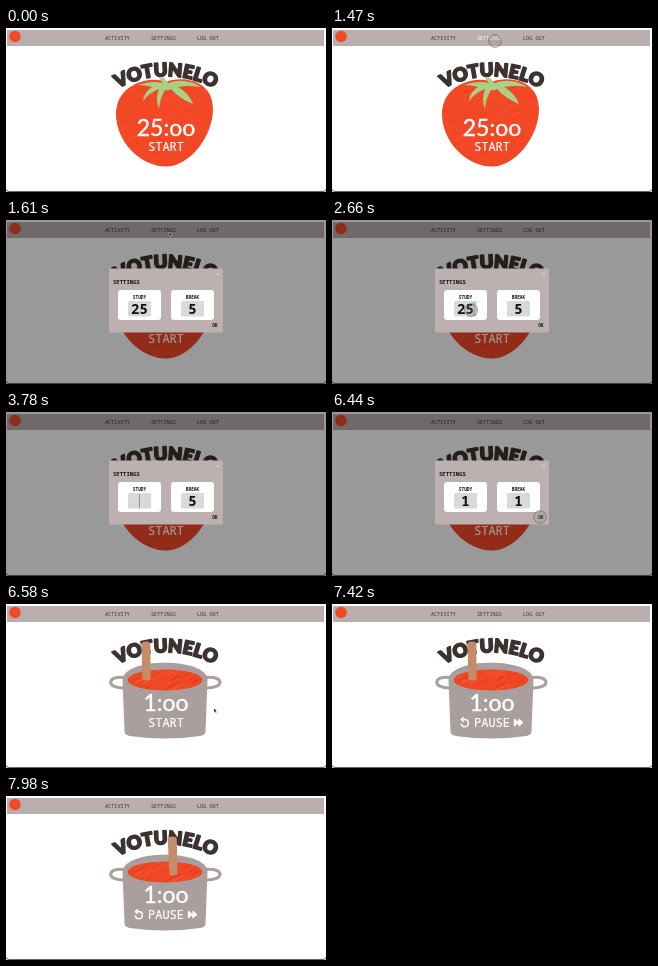
These frames come from a looping animation (320x164 px, 8000 ms). An HTML page:

```html
<!DOCTYPE html>
<html lang="en">
<head>
<meta charset="utf-8">
<title>Study timer</title>
<style>
  html, body { margin: 0; width: 100%; height: 100%; overflow: hidden; background: #fff; }
  svg { display: block; width: 100vw; height: 100vh; font-family: "Noto Sans Mono", "DejaVu Sans Mono", monospace; }
  text { stroke-linejoin: round; paint-order: stroke; }
  .nav { font-size: 5.2px; font-weight: 500; fill: #3a3131; }
  .nav .hover { fill: #fff; }
  .title { font-family: Lato, sans-serif; font-size: 18.5px; font-weight: 900; fill: #3b3231; stroke: #3b3231; stroke-width: 1.6; letter-spacing: -.2px; }
  .timer { fill: #fff; stroke: #fff; text-anchor: middle; }
  .clock { font-family: Lato, sans-serif; font-size: 23px; stroke-width: .4; }
  .action { font-size: 12px; stroke-width: .2; }
  .icon { fill: none; stroke: #fff; stroke-width: 1.4; stroke-linecap: round; stroke-linejoin: round; }
  .dialog { font-weight: 700; fill: #111; }
  .mid { text-anchor: middle; }
</style>
</head>
<body>
<svg viewBox="0 0 320 164" preserveAspectRatio="none">
  <defs>
    <path id="arc" d="M82 85A101 101 0 0 1 238 85"/>
    <path id="tomatoShape" d="M160 54C173 48 207 50 207 81C207 108 184 138.500 160 138.500C135 138.500 110 114 110 86C110 55 146 47 160 54Z"/>
    <path id="potShape" d="M116.500 76C116.500 53 201.500 53 201.500 76L199.500 128Q199 131 194 132Q159 137 124 132Q119 131 118.500 128Z"/>
    <ellipse id="soupShape" cx="159" cy="76" rx="37.500" ry="10.500"/>
    <clipPath id="tomatoClip"><use href="#tomatoShape"/></clipPath>
    <clipPath id="potClip"><use href="#potShape"/></clipPath>
    <clipPath id="soupClip"><use href="#soupShape"/></clipPath>
  </defs>

  <rect width="320" height="164" fill="#fff"/>
  <rect x="1" y="2" width="317" height="16" fill="#bbaeae"/>
  <circle cx="9" cy="8.500" r="5.800" fill="#f04a28"/>
  <g class="nav">
    <text x="99" y="12">ACTIVITY</text>
    <text id="settingsLink" x="145" y="12">SETTINGS</text>
    <text x="191" y="12">LOG OUT</text>
  </g>
  <path d="M0 161Q0 163.500 3 163.500H317Q320 163.500 320 161" fill="none" stroke="#666"/>

  <text class="title mid"><textPath href="#arc" startOffset="50%">VOTUNELO</textPath></text>

  <g id="tomato">
    <use href="#tomatoShape" fill="#f34826"/>
    <g id="tomatoGrain" clip-path="url(#tomatoClip)"/>
    <path fill="#a9d084" d="M132 57Q146 52 157 55Q154 52 153 50L158 50Q160 52 162 55Q180 49 195 59Q182 57 172 59Q183 65 187 76Q174 71 165 61Q163 63 159 62Q154 70 153 81Q149 71 153 61Q143 65 137 73Q138 64 146 59Q139 57 132 57Z"/>
  </g>

  <g id="pot">
    <g fill="none" stroke="#aaa09e" stroke-width="3">
      <path d="M119 73.500C100 71 100 85 119 84"/>
      <path d="M199 73.500C219 71 219 85 199 84"/>
    </g>
    <use href="#potShape" fill="#a99f9d"/>
    <g id="potGrain" clip-path="url(#potClip)"/>
    <use href="#soupShape" fill="#f04725"/>
    <g id="soupGrain" clip-path="url(#soupClip)"/>
    <path id="spoon" d="M-4.500 -35Q-4.500 -38 0 -38Q4.500 -38 4.500 -35L4 0Q0 2 -4 0Z" fill="#c28d68"/>
  </g>

  <text id="clock" class="timer clock" x="160" y="108"></text>
  <text id="action" class="timer action" x="160" y="122.800"></text>
  <g id="controls" class="icon">
    <path d="M129.500 115.500H133A3.600 3.600 0 1 1 129.300 120M131.300 113.600L129.300 115.500L131.300 117.400"/>
    <path d="M182.500 115.500L186 118.500L182.500 121.500ZM187 115.500L190.500 118.500L187 121.500Z" fill="#fff"/>
  </g>

  <g id="dialog" class="dialog">
    <rect width="320" height="164" fill="#000" opacity=".4"/>
    <rect x="103" y="48.500" width="114" height="64" rx="1" fill="#bdb0b0"/>
    <path d="M210.800 53.300l2 2m0-2l-2 2" stroke="#eee" stroke-width=".6"/>
    <text x="107" y="63.500" font-size="5.600">SETTINGS</text>
    <g fill="#fff">
      <rect x="112" y="70" width="43" height="30" rx="3"/>
      <rect x="165" y="70" width="43" height="30" rx="3"/>
    </g>
    <g fill="#d9d9d9">
      <rect x="122" y="81" width="23" height="15.500" rx="1"/>
      <rect x="175" y="81" width="23" height="15.500" rx="1"/>
    </g>
    <g class="mid" font-size="4.500">
      <text x="133.500" y="79">STUDY</text>
      <text x="186.500" y="79">BREAK</text>
      <text x="209" y="107">OK</text>
    </g>
    <g class="mid" font-size="14">
      <text id="study" x="133.500" y="93.500"></text>
      <text id="rest" x="186.500" y="93.500"></text>
    </g>
    <path id="caret" d="M0 82V96" stroke="#777" stroke-width=".7"/>
  </g>

  <g id="pointer">
    <circle id="ring" r="6.300" fill="#888" fill-opacity=".2" stroke="#6c6666" stroke-width=".7"/>
    <path id="arrow" d="M0 -1V3.200L1 2.300L1.800 3.800L2.500 3.400L1.800 2H3Z" fill="#111" stroke="#fff" stroke-width=".35"/>
  </g>
</svg>
<script>
const LOOP = 8000, TICK = 70;
const $ = id => document.getElementById(id);
const show = (id, on) => { $(id).style.display = on ? '' : 'none'; };
const within = (t, spans) => spans.some(([a, b]) => t >= a && t < b);
const latest = (t, steps) => steps.filter(s => s[0] <= t).pop()[1];

// Crayon strokes over a filled shape
function grain(id, count, seed, [x, y, w, h], colors, opacity) {
  const rand = () => (seed = seed * 16807 % 2147483647) / 2147483647;
  for (let i = 0; i < count; i++) {
    const line = document.createElementNS('http://www.w3.org/2000/svg', 'path');
    const len = 4 + rand() * 9;
    line.setAttribute('d', `M${x + rand() * w} ${y + rand() * h}l${len} ${-len * (.2 + rand() * .5)}`);
    line.setAttribute('stroke', colors[i % colors.length]);
    line.setAttribute('stroke-width', .6);
    line.setAttribute('opacity', opacity);
    $(id).append(line);
  }
}
grain('tomatoGrain', 120, 71, [106, 52, 100, 90], ['#ff7a50', '#d93618'], .3);
grain('potGrain', 110, 29, [112, 60, 88, 76], ['#bdb4b1', '#988d8b'], .3);
grain('soupGrain', 45, 53, [118, 66, 76, 22], ['#ff7b4e', '#d23116'], .55);

const path = [
  [700, 69, 163], [1400, 163, 13], [2030, 163, 13], [2520, 139, 90],
  [4270, 139, 90], [5040, 192, 90], [5740, 192, 90], [6370, 208, 105],
  [7000, 208, 106], [7350, 162, 119], [LOOP, 162, 119]
];
const pointerOn = [[700, 3570], [4340, 5600], [5810, 7420]];
const clicks = [[1470, 1610], [2660, 2800], [5110, 5250], [6440, 6580], [7350, 7420]];
const carets = [
  [0, 0], [2660, 142], [3220, 0], [3570, 138], [3710, 133.5],
  [4270, 138], [4830, 0], [5110, 191.5], [5600, 186.5], [5740, 191.5], [6300, 0]
];
const studyText = [[0, '25'], [3570, '2'], [3710, ''], [4270, '1']];
const restText = [[0, '5'], [5600, ''], [5740, '1']];
const spoonSteps = [[0, 0], [7630, .2], [7700, .4], [7770, .6], [7910, .8], [7980, 1]];

function pointerAt(t) {
  const i = path.findIndex(p => p[0] > t);
  if (i < 1) return path[0].slice(1);
  const [t0, x0, y0] = path[i - 1], [t1, x1, y1] = path[i];
  const u = (t - t0) / (t1 - t0), k = u * u * (3 - 2 * u);
  return [x0 + (x1 - x0) * k, y0 + (y1 - y0) * k];
}

function draw(time) {
  const t = Math.floor(time % LOOP / TICK) * TICK;
  const cooking = t >= 6580, running = t >= 7420;

  show('tomato', !cooking);
  show('pot', cooking);
  show('controls', running);
  show('dialog', within(t, [[1610, 6580]]));
  $('settingsLink').classList.toggle('hover', within(t, [[1330, 1610]]));
  $('clock').textContent = cooking ? '1:oo' : '25:oo';
  $('clock').setAttribute('y', cooking ? 107 : 108);
  $('action').textContent = running ? 'PAUSE' : 'START';

  $('study').textContent = latest(t, studyText);
  $('rest').textContent = latest(t, restText);
  const caret = latest(t, carets);
  show('caret', caret);
  $('caret').setAttribute('transform', `translate(${caret})`);

  const stir = latest(t, spoonSteps);
  $('spoon').setAttribute('transform',
    `translate(${140.5 + 27 * stir} ${75.5 + 3 * stir}) rotate(${-1 - stir})`);

  const clicking = within(t, clicks);
  show('pointer', within(t, pointerOn));
  show('ring', clicking);
  show('arrow', !clicking);
  $('pointer').setAttribute('transform', `translate(${pointerAt(t)})`);
}

function loop() {
  draw(performance.now());
  requestAnimationFrame(loop);
}
loop();
</script>
</body>
</html>
```
